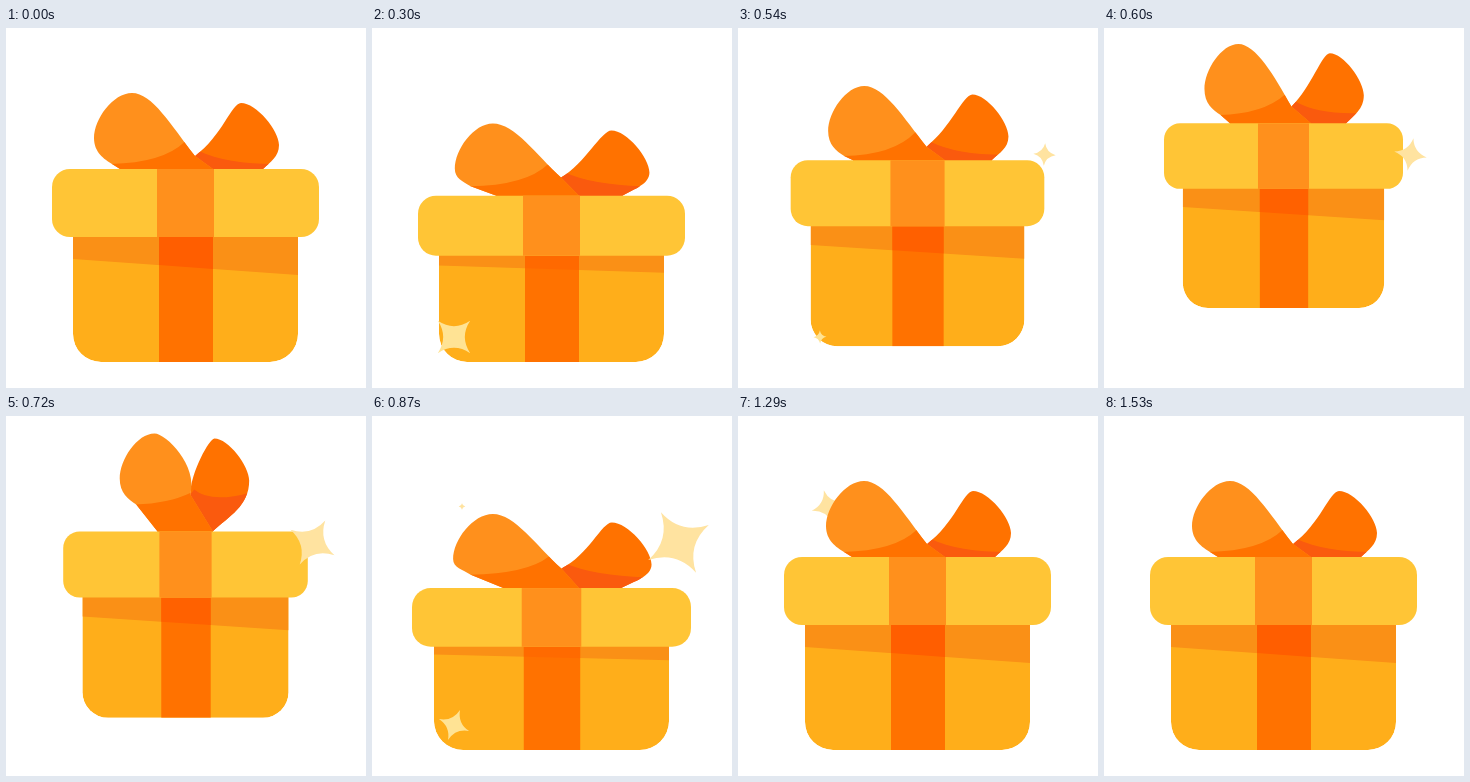
These frames come from a looping animation (360 px wide and 360 px high, 1560 ms). An HTML page:

```html
<!DOCTYPE html>
<html lang="en">
<head>
<meta charset="utf-8">
<title>Gift box</title>
<style>
html, body { margin: 0; width: 100%; height: 100%; overflow: hidden; background: #fff; }
svg { display: block; width: 100vw; height: 100vh; }
</style>
</head>
<body>
<svg viewBox="0 0 360 360">
  <defs>
    <clipPath id="clipL"><path id="maskL"/></clipPath>
    <clipPath id="clipR"><path id="maskR"/></clipPath>
    <clipPath id="clipB"><path id="maskB"/></clipPath>
  </defs>
  <path id="starTop" fill="#ffe3a0"/>
  <path id="loopR" fill="#ff7200"/>
  <path id="shadeR" fill="#fa5a0e" clip-path="url(#clipR)"/>
  <path id="loopL" fill="#ff901c"/>
  <path id="shadeL" fill="#ff7200" clip-path="url(#clipL)"/>
  <g clip-path="url(#clipB)">
    <path id="body" fill="#ffae1a"/>
    <path id="shade" fill="#fa9016"/>
    <path id="band" fill="#ff7200"/>
    <path id="bandShade" fill="#ff5e00"/>
  </g>
  <rect id="lid" fill="#ffc536"/>
  <rect id="lidBand" fill="#ff901c"/>
  <path id="starLow" fill="#ffe394"/>
  <path id="starLow2" fill="#ffe394"/>
  <path id="starRight" fill="#ffe3a0"/>
</svg>
<script>
const LOOP = 1560, STEP = 30, CX = 180;

const stars = [
  { id: "starLow", x: 82, y: 309, size: 24, from: 20, peak: 320, to: 580 },
  { id: "starLow2", x: 82, y: 309, size: 19, from: 790, peak: 890, to: 1040 },
  { id: "starRight", x: 306.5, y: 126.5, size: 35, from: 460, peak: 870, to: 1130 },
  { id: "starTop", x: 90, y: 90.5, size: 24, from: 850, peak: 1190, to: 1440 }
];

const span = (t, a, b) => Math.min(1, Math.max(0, (t - a) / (b - a)));
const smooth = u => u * u * (3 - 2 * u);
// Eases from 0 at a to 1 at peak and back to 0 at b
const bump = (t, a, peak, b) => smooth(t < peak ? span(t, a, peak) : 1 - span(t, peak, b));

function set(id, attrs) {
  const el = document.getElementById(id);
  for (const k in attrs) el.setAttribute(k, attrs[k]);
}
const path = (id, ...parts) => set(id, { d: parts.join(" ") });

function cubic(a, b, c, d, u) {
  const v = 1 - u;
  return [0, 1].map(k => v*v*v*a[k] + 3*v*v*u*b[k] + 3*v*u*u*c[k] + u*u*u*d[k]);
}

// Crouch, jump, landing squash and settling bow
function poseAt(t) {
  const land = bump(t, 740, 870, 1040);
  const squash = bump(t, 0, 450, 560) + .94 * land;
  const w = 1 - .12 * bump(t, 460, 640, 860) + .045 * land;
  const h = w ** .4 * (1 - .187 * squash);
  const lift = 61.3 * Math.max(0, 1 - ((t - 640) / 116) ** 2);
  const base = 334 - lift;
  return {
    w, h, base, squash,
    top: base - 193 * h,
    flat: bump(t, 0, 450, 600) + .9 * bump(t, 760, 1000, 1230),
    close: bump(t, 560, 720, 860)
  };
}

function drawBow({ w, top, squash: s, flat: f, close: c }) {
  const pt = (x, y, dx = 0, dy = 0) => [CX + x * w + dx, top + y + dy];
  const floor = top + 3;
  const K = pt(9, -13, -4 * c, -24 * c - 7 * s);

  // Closing slides both loops up and inward, flattening spreads them
  const lx = 18 * c - 7 * f, ly = 5 * f - 22 * c;
  const C = pt(-15, -44, 26 * c, ly), T = pt(-54, -76, lx, ly);
  const L = pt(-92, -31, lx, ly), E = pt(-74, -5, lx - 3 * f, ly - 11 * s);
  const B = pt(-66, 0, 32 * c - 13 * f + 27 * s);
  const T1 = [T[0] + .32 * (K[0] - T[0]), T[1]];
  const left = ["M", K, "C", C, T1, T,
    "C", [T[0] + .5 * (L[0] - T[0]), T[1]], [L[0], L[1] + .42 * (T[1] - L[1])], L,
    "C", [L[0], L[1] + .55 * (E[1] - L[1])], [E[0] - 8, E[1] - 5], E,
    "L", B, [B[0], floor], [207, floor], [207, top], "Z"];
  path("loopL", ...left);
  path("maskL", ...left);
  const D = cubic(K, C, T1, T, .15 + .05 * f - .13 * c);
  path("shadeL", "M", [E[0] - 1, E[1]], "Q", [D[0] - 22, E[1] - 1], D,
    "L", [D[0] + 30, D[1] - 10], [230, floor], [E[0] - 1, floor], "Z");

  const rx = 6 * f - 22 * c, ry = f - 27 * c;
  const C2 = pt(36, -33, -28 * c - 4 * f, ry), T2 = pt(55, -66, rx, ry);
  const R = pt(93, -24, rx, ry), B2 = pt(77, 0, 5 * f - 44 * c - 14 * s);
  const right = ["M", K, "C", C2, [T2[0] + .2 * (K[0] - T2[0]), T2[1]], T2,
    "C", [T2[0] + .4 * (R[0] - T2[0]), T2[1]], [R[0], R[1] + .35 * (T2[1] - R[1])], R,
    "C", [R[0], R[1] + .5 * (top - R[1])], [B2[0] + .45 * (R[0] - B2[0]), top + .3 * (R[1] - top)], B2,
    "L", [B2[0], floor], [196, floor], "Z"];
  path("loopR", ...right);
  path("maskR", ...right);
  const H = pt(90, -5, -18 * c, -34 * c - 6 * s);
  path("shadeR", "M", [K[0] + 4, K[1] - 5], "Q", pt(40, -5, -12 * c, -23 * c - 8 * s), H,
    "L", [H[0] + 20, floor], [CX, floor], K, "Z");
}

function drawBox({ w, h, top, base }) {
  const lidH = 68 * (.15 + .85 * h), low = top + lidH, lidW = 267 * w, lidX = CX - .5 - lidW / 2;
  const bw = 225 * w, x = CX - .5 - bw / 2, x2 = x + bw, y = low - 4, r = 28 * w;
  const shape = `M${x} ${y}H${x2}V${base - r}A${r} ${r} 0 0 1 ${x2 - r} ${base}H${x + r}A${r} ${r} 0 0 1 ${x} ${base - r}Z`;
  path("body", shape);
  path("maskB", shape);

  // The lid's slanted shadow shrinks as the box is pressed down
  const depth = Math.min(1, 1 - 4 * (1 - h));
  const edge = px => low + depth * (22 + 16 * (px - x) / bw);
  const under = (a, b) => `M${a} ${y}H${b}V${edge(b)}L${a} ${edge(a)}Z`;
  const b1 = CX - 27 * w, b2 = CX + 27 * w;
  path("shade", under(x, x2));
  path("band", `M${b1} ${y}H${b2}V${base}H${b1}Z`);
  path("bandShade", under(b1, b2));
  set("bandShade", { "fill-opacity": depth });

  set("lid", { x: lidX, y: top, width: lidW, height: lidH, rx: 18 * w, ry: 18 * w });
  set("lidBand", { x: CX - .5 - 28.5 * w, y: top, width: 57 * w, height: lidH });
}

function drawStar({ id, x, y, size, from, peak, to }, t) {
  const u = t < peak ? span(t, from, peak) : 1 - span(t, peak, to);
  const r = size * u ** .7, c = r * .17;
  path(id, `M0 ${-r}Q${c} ${-c} ${r} 0Q${c} ${c} 0 ${r}Q${-c} ${c} ${-r} 0Q${-c} ${-c} 0 ${-r}Z`);
  set(id, {
    transform: `translate(${x} ${y}) rotate(${90 * smooth(span(t, from, to))})`,
    visibility: u > 0 ? "visible" : "hidden"
  });
}

function draw(t) {
  const pose = poseAt(t);
  drawBow(pose);
  drawBox(pose);
  stars.forEach(star => drawStar(star, t));
}

const start = performance.now();
function tick() {
  const t = (performance.now() - start) % LOOP;
  draw(Math.floor(t / STEP) * STEP);
  requestAnimationFrame(tick);
}
tick();
</script>
</body>
</html>
```
